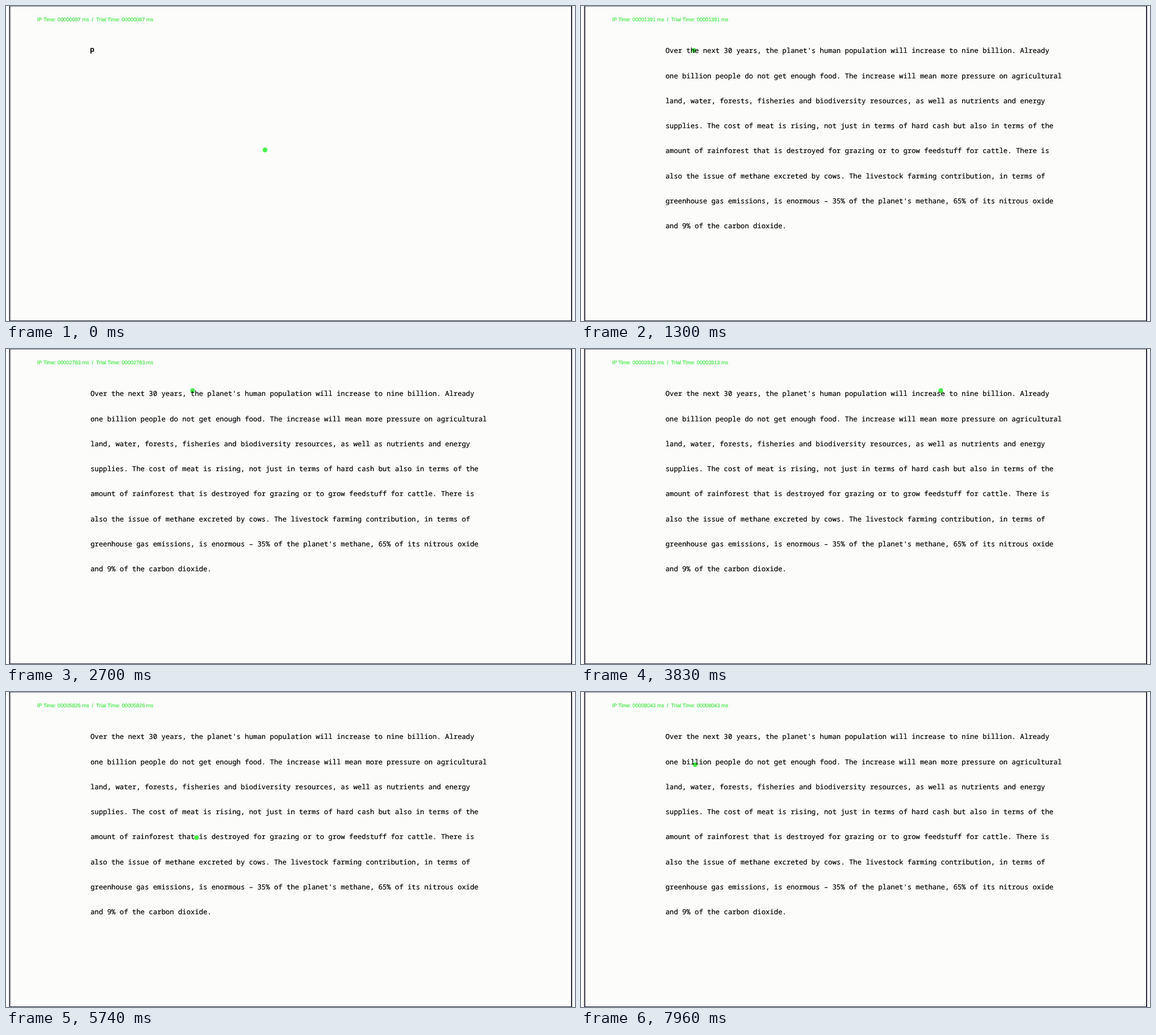
Write an HTML page that moves like this. It is 1005 px wide and 557 px high and loops after 8 s.

```html
<!DOCTYPE html>
<html lang="en">
<head>
<meta charset="utf-8">
<title>Gaze replay</title>
<style>
html, body { margin: 0; width: 100%; height: 100%; overflow: hidden; background: #fff; }
svg { display: block; }
text { white-space: pre; text-rendering: geometricPrecision; }
#clock { font: 9.2px "Liberation Sans", Arial, sans-serif; fill: #3be63b; stroke: #3be63b; stroke-width: .15px; }
#page { font: 12.29px "Noto Sans Mono", monospace; stroke: #000; stroke-width: .2px; }
#cue { font: bold 12.5px "Noto Sans Mono", monospace; }
</style>
</head>
<body>
<svg width="1005" height="557" viewBox="0 0 1005 557">
  <rect x="6" width="993" height="557" fill="#fcfcfb"/>
  <g fill="#2a2a38">
    <rect x="5.5" width="2" height="557"/>
    <rect x="998" width="2" height="557"/>
    <rect x="6" width="994" height="1" opacity=".6"/>
    <rect x="6" y="556" width="994" height="1"/>
  </g>
  <text id="clock" x="55" y="26.7"></text>
  <circle id="gaze" r="4.2" fill="#4bee4b"/>
  <text id="cue" x="148.4" y="81">p</text>
  <g id="page"></g>
</svg>
<script>
const LOOP = 8000, FPS = 23, TEXT_ONSET = 950, FIXATION = 270;
const lines = [
  "Over the next 30 years, the planet's human population will increase to nine billion. Already",
  "one billion people do not get enough food. The increase will mean more pressure on agricultural",
  "land, water, forests, fisheries and biodiversity resources, as well as nutrients and energy",
  "supplies. The cost of meat is rising, not just in terms of hard cash but also in terms of the",
  "amount of rainforest that is destroyed for grazing or to grow feedstuff for cattle. There is",
  "also the issue of methane excreted by cows. The livestock farming contribution, in terms of",
  "greenhouse gas emissions, is enormous – 35% of the planet's methane, 65% of its nitrous oxide",
  "and 9% of the carbon dioxide."
];
// Turning points of the reading path
const path = [
  { at: 0, x: 457, y: 254 },
  { at: 500, x: 155, y: 79 },
  { at: 1150, x: 199, y: 78 },
  { at: 2250, x: 262, y: 92 },
  { at: 2600, x: 329, y: 73 },
  { at: 3800, x: 635, y: 73 },
  { at: 4600, x: 808, y: 79 },
  { at: 5600, x: 336, y: 257 },
  { at: 5950, x: 420, y: 287 },
  { at: 6650, x: 808, y: 80 },
  { at: 6950, x: 214, y: 132 },
  { at: 7350, x: 250, y: 129 },
  { at: 7700, x: 201, y: 128 },
  { at: LOOP, x: 201, y: 128 }
];
const [clock, gaze, cue, page] = ["clock", "gaze", "cue", "page"].map(id => document.getElementById(id));

lines.forEach((line, i) => {
  const row = document.createElementNS(page.namespaceURI, "text");
  row.setAttribute("x", 149.2);
  row.setAttribute("y", 83.3 + i * 44.25);
  row.textContent = line;
  page.append(row);
});

// The eye rests, then jumps: each leg is split into equal hops
function gazeAt(time) {
  const next = path.findIndex(point => point.at > time);
  const from = path[next - 1], to = path[next];
  const span = to.at - from.at;
  const hops = Math.max(1, Math.round(span / FIXATION));
  const part = Math.floor((time - from.at) / span * hops) / hops;
  return [from.x + (to.x - from.x) * part, from.y + (to.y - from.y) * part];
}

function draw(now) {
  const t = Math.floor(now % LOOP / 10) * 10;
  const step = Math.floor((t + 5) * FPS / 1000);
  const time = step * 1000 / FPS;
  const stamp = String(Math.round((step + 2) * 1000 / FPS)).padStart(8, "0");
  clock.textContent = `IP Time: ${stamp} ms  /  Trial Time: ${stamp} ms`;

  const [x, y] = gazeAt(time);
  gaze.setAttribute("cx", x + 0.5);
  gaze.setAttribute("cy", y + 0.5);

  const reading = time >= TEXT_ONSET;
  cue.style.display = reading ? "none" : "";
  page.style.display = reading ? "" : "none";
}

function tick() {
  draw(performance.now());
  requestAnimationFrame(tick);
}
tick();
</script>
</body>
</html>
```
